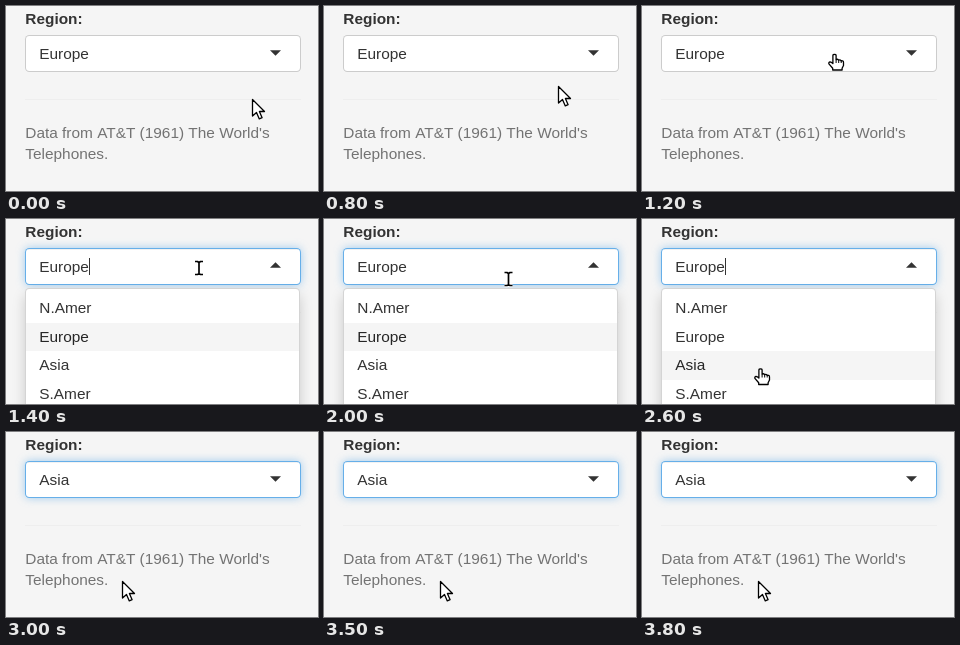
An HTML page with a canvas for the animation above (5.5 s loop, 312 by 185 pixels).

```html
<!DOCTYPE html>
<html lang="en">
<head>
<meta charset="utf-8">
<title>Region select</title>
<style>
  html, body { margin: 0; width: 100%; height: 100%; overflow: hidden; background: #f5f5f5; }
  canvas { display: block; width: 312px; height: 185px; }
</style>
</head>
<body>
<canvas id="stage" width="312" height="185"></canvas>
<script>
const ctx = document.getElementById('stage').getContext('2d');
const LOOP = 5500, STEP = 100;
const OPEN = 1400, CLOSE = 3000, BLINK = 600;
const FONT = '15.4px "Liberation Sans", Arial, sans-serif';
const OPTIONS = ['N.Amer', 'Europe', 'Asia', 'S.Amer'];
const LIST_TOP = 75, ROW = 28.6;

// Pointer path: time, x, y
const PATH = [
  [700, 246.5, 93.5], [800, 234.5, 80.5], [1000, 206, 58], [1100, 197, 51], [1200, 192.5, 48],
  [1900, 192.5, 48], [2000, 184, 59], [2200, 152.5, 103.4], [2400, 125, 141], [2500, 118.5, 149.5],
  [2900, 118.5, 149.5], [3000, 116.5, 149.5], [5400, 116.5, 149.5]
];

const ARROW = new Path2D('M0 0V16.6L4 13L6.8 19.4L9.6 18.2L6.9 12H12Z');
const HAND = new Path2D('M-1.6 9.6V1.6Q-1.6 .3 0 .3Q1.6 .3 1.6 1.6V5.6Q3 4.7 4.2 6.1' +
  'Q5.7 5.4 6.7 6.8Q9 6.5 9 8.6V11.5L7.6 14.2V16H-1.8V14.2L-5.6 9.9Q-6.1 8.2-4.4 7.9Q-3.2 8-1.6 9.6Z');
const KNUCKLES = new Path2D('M1.6 5.6V9M4.2 6.1V9M6.7 6.8V9');
const BEAM = new Path2D('M-3.5-6H-1L.5-5L2-6H4.5M.5-5V6M-3.5 7H-1L.5 6L2 7H4.5');

function pointerAt(t) {
  if (t <= PATH[0][0]) return PATH[0].slice(1);
  const i = PATH.findIndex(key => key[0] >= t);
  const [t0, x0, y0] = PATH[i - 1], [t1, x1, y1] = PATH[i];
  const k = (t - t0) / (t1 - t0);
  return [x0 + (x1 - x0) * k, y0 + (y1 - y0) * k];
}

function text(str, x, y, color = '#333', weight = '') {
  ctx.font = weight + ' ' + FONT;
  ctx.fillStyle = color;
  ctx.fillText(str, x, y);
}

function roundBox(x, y, w, h, r, fill) {
  ctx.beginPath();
  ctx.roundRect(x, y, w, h, r);
  ctx.fillStyle = fill;
  ctx.fill();
}

function withShadow(color, blur, dy, draw) {
  ctx.save();
  ctx.shadowColor = color;
  ctx.shadowBlur = blur;
  ctx.shadowOffsetY = dy;
  draw();
  ctx.restore();
}

function drawField(value, focused, open) {
  const border = focused ? '#66afe9' : '#ccc';
  const frame = () => roundBox(19, 29, 276, 37, 4.4, border);
  if (focused) withShadow('rgba(102,175,233,.6)', 8.8, 0, frame);
  else frame();
  roundBox(20, 30, 274, 35, 3.4, '#fff');
  if (focused) {
    ctx.fillStyle = 'rgba(0,0,0,.05)';
    ctx.fillRect(22, 30, 270, 1);
  }
  text(value, 33.3, 53);

  const base = open ? 48.8 : 44.2, tip = open ? 43.2 : 49.8;
  ctx.beginPath();
  ctx.moveTo(264, base);
  ctx.lineTo(275, base);
  ctx.lineTo(269.5, tip);
  ctx.fillStyle = '#333';
  ctx.fill();
}

function drawList(active) {
  withShadow('rgba(0,0,0,.175)', 13.2, 6.6, () => roundBox(19, 69, 275, 160, 4.4, '#d4d4d4'));
  roundBox(20, 70, 273, 158, 3.4, '#fff');
  OPTIONS.forEach((name, i) => {
    if (i === active) {
      const top = Math.round(LIST_TOP + i * ROW);
      ctx.fillStyle = '#f5f5f5';
      ctx.fillRect(20, top, 273, Math.round(LIST_TOP + (i + 1) * ROW) - top);
    }
    text(name, 33.3, Math.round(94 + i * ROW), i === active ? '#262626' : '#333');
  });
}

function drawPointer(kind, x, y) {
  const line = (path, color, width) => {
    ctx.strokeStyle = color;
    ctx.lineWidth = width;
    ctx.stroke(path);
  };
  ctx.save();
  ctx.translate(x, y);
  ctx.lineJoin = 'round';
  if (kind === 'beam') {
    ctx.translate(0, .5);
    line(BEAM, '#fff', 3.5);
    line(BEAM, '#000', 1.7);
  } else {
    const shape = kind === 'hand' ? HAND : ARROW;
    ctx.fillStyle = '#fff';
    ctx.fill(shape);
    line(shape, '#000', 1.3);
    if (kind === 'hand') line(KNUCKLES, '#000', 1);
  }
  ctx.restore();
}

function draw(t) {
  const open = t >= OPEN && t < CLOSE;
  const [x, y] = pointerAt(t);
  const inField = y < 66;

  ctx.fillStyle = '#f5f5f5';
  ctx.fillRect(0, 0, 312, 185);
  text('Region:', 19.3, 18, '#333', 'bold');
  ctx.fillStyle = '#eee';
  ctx.fillRect(19, 93, 276, 1);
  text("Data from AT&T (1961) The World's", 19.3, 132, '#737373');
  text('Telephones.', 19.3, 153, '#737373');

  drawField(t < CLOSE ? 'Europe' : 'Asia', t >= OPEN, open);
  if (open) {
    drawList(y < LIST_TOP ? 1 : Math.floor((y - LIST_TOP) / ROW));
    if (Math.floor((t - OPEN) / BLINK) % 2 === 0) {
      ctx.fillStyle = '#333';
      ctx.fillRect(83, 39, 1, 17);
    }
  }

  const kind = open ? (inField ? 'beam' : 'hand') : (inField ? 'hand' : 'arrow');
  drawPointer(kind, x, y);
}

const start = performance.now();
function tick() {
  const t = (performance.now() - start) % LOOP;
  draw(Math.floor(t / STEP) * STEP);
  requestAnimationFrame(tick);
}
tick();
</script>
</body>
</html>
```
